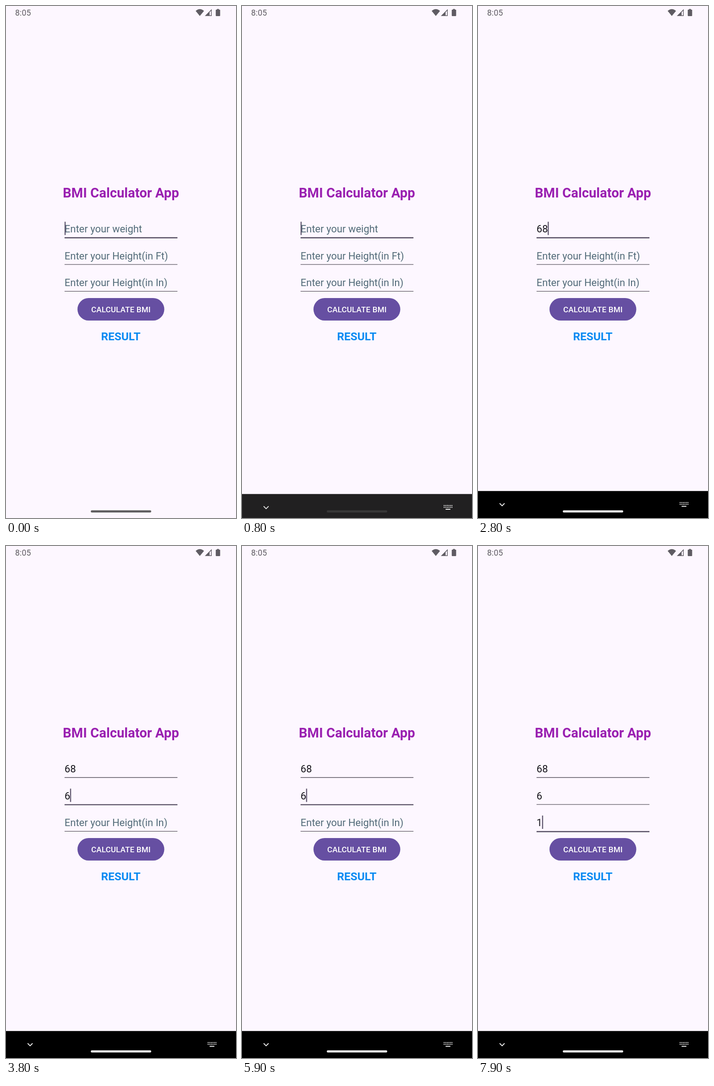
Write an HTML page with a canvas that moves like this. It is 502x1115 px and loops after 8 s.

```html
<!DOCTYPE html>
<html lang="en">
<head>
<meta charset="utf-8">
<title>BMI Calculator App</title>
<style>
html, body { margin: 0; width: 100%; height: 100%; overflow: hidden; background: #fdf7ff; }
canvas { display: block; width: 502px; height: 1115px; }
</style>
</head>
<body>
<canvas id="stage" width="502" height="1115"></canvas>
<script>
const ctx = document.getElementById('stage').getContext('2d');
const LOOP = 8000, BLINK = 500;
const GREY = '#5f5c63';

// Each event restarts the caret blink; values hold what the three fields contain.
const events = [
  { at: -200, focus: 0, values: ['', '', ''] },
  { at: 500, focus: 0, values: ['', '', ''] },
  { at: 1200, focus: 0, values: ['6', '', ''] },
  { at: 2400, focus: 0, values: ['68', '', ''] },
  { at: 3100, focus: 1, values: ['68', '', ''] },
  { at: 3700, focus: 1, values: ['68', '6', ''] },
  { at: 6100, focus: 2, values: ['68', '6', ''] },
  { at: 6800, focus: 2, values: ['68', '6', '1'] }
];
const hints = ['Enter your weight', 'Enter your Height(in Ft)', 'Enter your Height(in In)'];

const clamp = v => Math.max(0, Math.min(1, v));

function text(str, x, y, size, color, weight = 400, align = 'left', spacing = 0) {
  ctx.font = `${weight} ${size}px Roboto, sans-serif`;
  ctx.letterSpacing = spacing + 'px';
  ctx.textAlign = align;
  ctx.fillStyle = color;
  ctx.fillText(str, x, y);
}

function box(x, y, w, h, color, r = 0) {
  ctx.fillStyle = color;
  ctx.beginPath();
  ctx.roundRect(x, y, w, h, r);
  ctx.fill();
}

function polygon(color, ...points) {
  ctx.fillStyle = color;
  ctx.beginPath();
  points.forEach(p => ctx.lineTo(...p));
  ctx.fill();
}

function statusBar() {
  text('8:05', 20, 20.7, 17.5, GREY, 400, 'left', 0.2);
  ctx.fillStyle = GREY;
  ctx.beginPath();
  ctx.moveTo(423, 21.8);
  ctx.lineTo(414, 10.7);
  ctx.quadraticCurveTo(423, 3, 432.2, 10.7);
  ctx.fill();
  polygon(GREY, [434, 21.8], [449, 6.8], [449, 21.8]);
  polygon('#fdf7ff', [444.4, 13.4], [447.6, 10.2], [447.6, 20.3], [444.4, 20.3]);
  box(457.8, 8, 9.6, 14, GREY, 1.3);
  box(460.4, 6.6, 4.4, 2.4, GREY, 0.5);
}

function field(i, state, caretOn) {
  const y = 58.6 * i;
  const value = state.values[i];
  const focused = state.focus === i;
  text(value || hints[i], 127.8, 493 + y, 21.97, value ? '#17151c' : '#526b78');
  box(127.8, 503.6 + y, 246.4, focused ? 2.4 : 1.3, focused ? '#544d61' : '#5b5761');
  if (focused && caretOn) {
    const x = value ? 127.4 + ctx.measureText(value).width : 127.8;
    box(x, 469.8 + y, 2.4, 29, '#625a70');
  }
}

function keyboardBar(t) {
  const p = clamp((t - 600) / 300);
  if (p === 0) return;
  const shown = 1 - (1 - p) ** 2;
  ctx.save();
  ctx.translate(0, 59 * (1 - shown));
  ctx.globalAlpha = clamp(shown * 0.9 + 0.1 * p);
  box(0, 1056.3, 502, 60, '#000');
  ctx.globalAlpha = 1;
  ctx.strokeStyle = '#eee';
  ctx.lineWidth = 1.8;
  ctx.beginPath();
  ctx.moveTo(47.2, 1083);
  ctx.lineTo(52.6, 1088.4);
  ctx.lineTo(58, 1083);
  ctx.stroke();
  for (let row = 0; row < 2; row++)
    for (let col = 0; col < 6; col++)
      box(440.2 + col * 3.4, 1080.4 + row * 3.8, 2, 2, '#eee');
  box(444.4, 1088.6, 10.4, 2, '#eee');
  ctx.restore();
}

function homePill(t) {
  const white = clamp((t - 750) / 200);
  const tone = Math.round(255 * white);
  const alpha = 0.62 + 0.31 * white;
  box(185, 1098.3, 132, 4.8, `rgba(${tone},${tone},${tone},${alpha})`, 2.4);
}

function draw(t) {
  const state = events.findLast(e => e.at <= t);
  const caretOn = Math.floor((t - state.at) / BLINK) % 2 === 0;
  box(0, 0, 502, 1115, '#fdf7ff');
  statusBar();
  text('BMI Calculator App', 250.8, 417, 29.28, '#9a20b1', 700, 'center');
  hints.forEach((_, i) => field(i, state, caretOn));
  box(156, 636, 189.5, 49, '#664fa2', 24.5);
  text('CALCULATE BMI', 250.8, 667.2, 17.08, '#fff', 500, 'center', 0.12);
  text('RESULT', 250.6, 728.3, 24.41, '#0b8bf2', 700, 'center');
  keyboardBar(t);
  homePill(t);
}

const start = performance.now();
function tick() {
  draw((performance.now() - start) % LOOP);
  requestAnimationFrame(tick);
}
tick();
</script>
</body>
</html>
```
